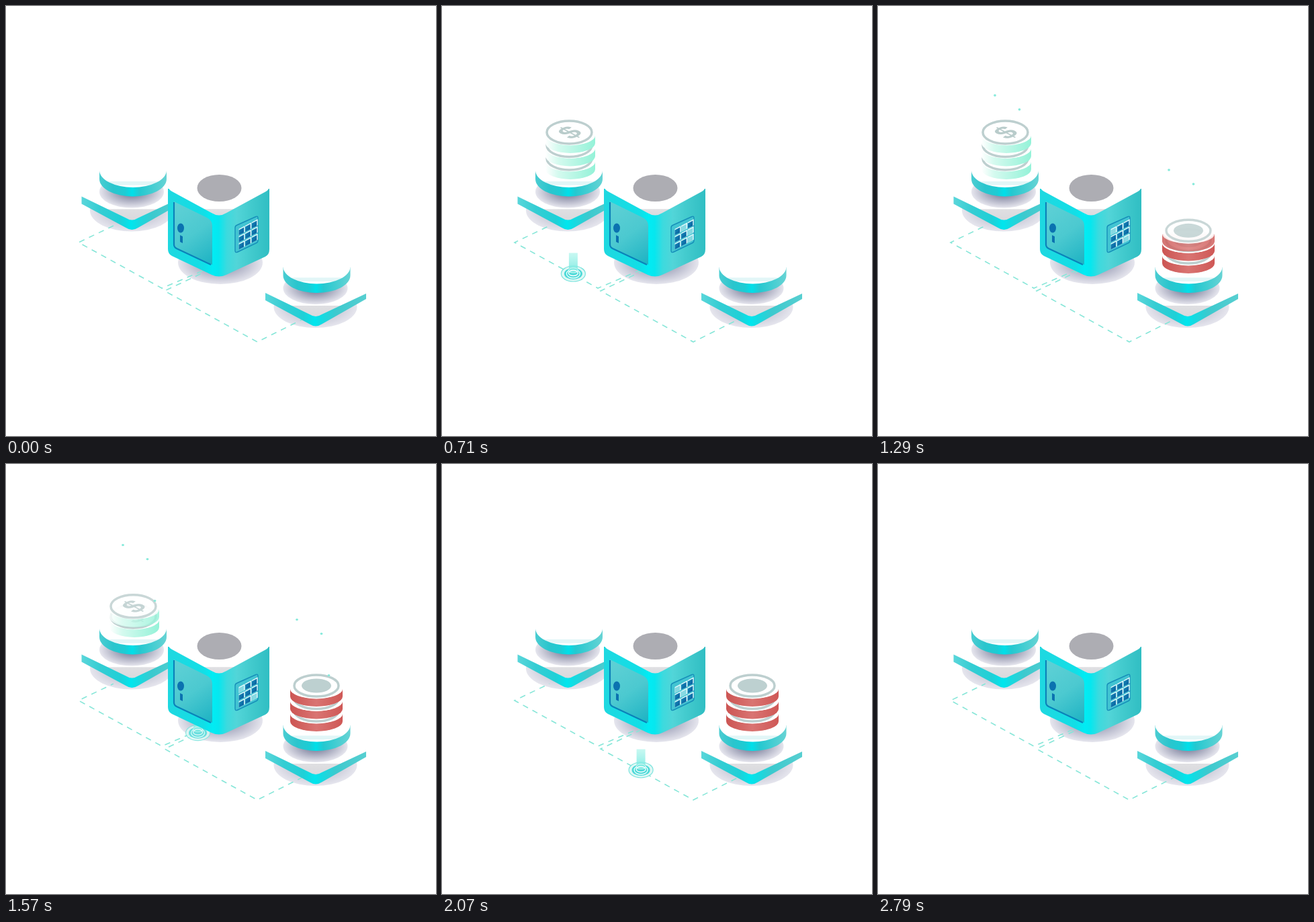
Recreate the animation shown at these times as an HTML page with a canvas. Size 640 px wide and 640 px high, loop 2.87 s.

```html
<!DOCTYPE html>
<html lang="en">
<head>
<meta charset="utf-8">
<title>Coin vault</title>
<style>
  html, body { margin: 0; width: 100%; height: 100%; overflow: hidden; background: #fff; }
  canvas { display: block; width: 640px; height: 640px; }
</style>
</head>
<body>
<canvas id="stage" width="640" height="640"></canvas>
<script>
const ctx = document.getElementById('stage').getContext('2d');
const LOOP = 2870, STEPS = 40;
const LEFT = [-273.5, -143.5], RIGHT = [0, 0];
const clamp = v => Math.max(0, Math.min(1, v));

function gradient(x0, y0, x1, y1, stops) {
  const g = ctx.createLinearGradient(x0, y0, x1, y1);
  stops.forEach(([at, color]) => g.addColorStop(at, color));
  return g;
}

function shape(d, fill, stroke, width = 1) {
  const path = new Path2D(d);
  if (fill) { ctx.fillStyle = fill; ctx.fill(path); }
  if (stroke) { ctx.strokeStyle = stroke; ctx.lineWidth = width; ctx.stroke(path); }
}

function ellipse(x, y, rx, ry, fill, stroke, width = 1) {
  ctx.beginPath();
  ctx.ellipse(x, y, rx, ry, 0, 0, Math.PI * 2);
  if (fill) { ctx.fillStyle = fill; ctx.fill(); }
  if (stroke) { ctx.strokeStyle = stroke; ctx.lineWidth = width; ctx.stroke(); }
}

function rim(x, y, rx, ry, height, fill) {
  ctx.beginPath();
  ctx.moveTo(x - rx, y);
  ctx.ellipse(x, y + height, rx, ry, 0, Math.PI, 0, true);
  ctx.lineTo(x + rx, y);
  ctx.fillStyle = fill;
  ctx.fill();
}

function shadow(x, y, rx, ry, inner) {
  ctx.save();
  ctx.translate(x, y);
  ctx.scale(rx, ry);
  const g = ctx.createRadialGradient(0, 0, 0.3, 0, 0, 1);
  g.addColorStop(0, inner);
  g.addColorStop(1, '#e6e6ee');
  ellipse(0, 0, 1, 1, g);
  ctx.restore();
}

function at([dx, dy], draw) {
  ctx.save();
  ctx.translate(dx, dy);
  draw();
  ctx.restore();
}

function platform() {
  shape('M386 427V438L452 473.5Q461 479.5 470 473.5L536 436V428Z', gradient(386, 0, 536, 0, [
    [0, '#5ad6da'], [.18, '#35cdd3'], [.38, '#1fd0d7'], [.49, '#00e6ee'], [.56, '#14dbe2'],
    [.7, '#3cc9ce'], [1, '#58cfd1']]));
  shape('M386 427L452 459Q461 465 470 459L536 428L470 396Q461 391 452 396Z', gradient(0, 390, 0, 464, [
    [0, '#fff'], [.75, '#fff'], [.76, '#dfdfe2'], [1, '#d8d8dc']]));
  shadow(460.5, 420, 48, 24, '#8d90a9');
  rim(462.5, 389, 50, 26, 12, gradient(413, 0, 512, 0, [
    [0, '#4acdd2'], [.2, '#2bc5cd'], [.38, '#1cccd4'], [.49, '#00dfe9'], [.6, '#24c8d0'], [1, '#66d3d4']]));
  ellipse(462.5, 388, 50, 25.5, gradient(0, 362, 0, 414, [
    [0, '#fff'], [.81, '#fff'], [.82, '#e2f6f7'], [.92, '#e2f6f7'], [.93, '#fff'], [1, '#fff']]));
}

function vault(step) {
  shape('M241 272V362Q241 369 247 372L306 400Q317 405 328 400L386 373Q392 370 392 362V272Z',
    gradient(241, 0, 392, 0, [[0, '#1fd8e0'], [.35, '#12dee6'], [.44, '#00ecf4'], [.5, '#06e7ef'],
      [.58, '#3cdade'], [.68, '#52d5d8'], [.82, '#42cacd'], [1, '#30bec3']]));
  shape('M247 266L307 237Q317 232 327 237L387 266Q395 271 387 276L328 308Q317 315 306 308L247 276Q238 271 247 266Z',
    gradient(0, 233, 0, 314, [[0, '#fff'], [.85, '#fff'], [.86, '#e0e0e3'], [1, '#d9d9dd']]));
  ellipse(317.5, 271, 33, 20, '#adadb3');

  // Door
  shape('M250 291L299 315Q307 319 307 327V385L250 358Z', gradient(250, 300, 306, 380, [
    [0, '#5dd0d5'], [.5, '#4cc9d0'], [1, '#20b4c4']]));
  shape('M250 292V355Q250 359 254 361L305 385', null, '#0b82b9', 2.2);
  ellipse(260, 330.5, 5, 7, '#0b72b0');
  shape('M259 341L263 343V353L259 351Z', '#0b72b0');
  keypad(step);
}

const litKeys = [[0, 7], [1, 5, 8], [0, 8], [4, 0], [2, 6]];
function keypad(step) {
  shape('M341 330Q341 327 344 326L372 313.5Q375 312 375 316V349Q375 352 372 353L345 366Q341 368 341 364Z',
    '#42c4d2', '#168fb9', 1.4);
  const lit = step < 2 || step > 35 ? [] : litKeys[Math.floor((step - 2) / 7)];
  for (let i = 0; i < 9; i++) {
    const col = i % 3, row = (i - col) / 3;
    ctx.save();
    ctx.transform(1, -.52, 0, 1, 346.5 + col * 9.6, 333 - col * 5 + row * 10.7);
    ctx.fillStyle = '#e8fbfd';
    ctx.fillRect(0, -1, 9, 9);
    ctx.fillStyle = lit.includes(i) ? '#86d9e2' : gradient(0, 0, 8, 8, [[0, '#1686b6'], [1, '#075f9f']]);
    ctx.fillRect(0, .5, 7.6, 7.6);
    ctx.restore();
  }
}

function coin(x, y, rx, edge, ringX, ringRx, ringRy) {
  rim(x, y + 5, rx, 15, 11, edge);
  rim(x, y, rx, 14, 5, '#fff');
  ellipse(x, y, rx, 19.5, '#fff');
  ellipse(ringX, y, ringRx, ringRy, null, '#bdcfcf', 3.5);
}

function mintCoin(y) {
  coin(191, y, 37, gradient(154, 0, 228, 0, [[0, '#fff'], [.25, '#d5faef'], [1, '#94f2d8']]), 189.5, 33.5, 17);
  ctx.save();
  ctx.transform(.87, -.47, .87, .47, 190, y);
  ctx.font = 'bold 39px "Liberation Sans", Arial, sans-serif';
  ctx.textAlign = 'center';
  ctx.fillStyle = '#b9cccb';
  ctx.fillText('$', 0, 13.5);
  ctx.restore();
}

function redCoin(y) {
  coin(462, y, 39, gradient(423, 0, 501, 0, [[0, '#cc5553'], [.5, '#d97472'], [1, '#cf5856']]), 462, 33, 16);
  ellipse(462, y, 22, 10.5, '#bdd0d0');
}

// Each coin rises into place from its start step and sinks away before its end step.
function stack(step, base, gap, spans, drawCoin) {
  spans.forEach(([start, end], level) => {
    const shown = Math.min(clamp((step - start) / 3), clamp((end - step) / 3));
    if (!shown) return;
    ctx.globalAlpha = Math.sqrt(shown);
    drawCoin(base - gap * level + 13 * (1 - shown));
    ctx.globalAlpha = 1;
  });
}

function sparks(step) {
  [[174, 133, 12], [210.5, 154, 12], [221.5, 216, 22]].forEach(([x, y, start]) => {
    if (step < start) return;
    ctx.globalAlpha = clamp((28 - step) / 4);
    ellipse(x, y - (step - 18) * 3.1, 1.9, 1.7, '#86eadb');
  });
  ctx.globalAlpha = 1;
}

function dashes(step) {
  ctx.save();
  ctx.setLineDash([8.5, 7.5]);
  ctx.lineDashOffset = -step / STEPS * 80;
  shape('M160 327L108 352L232 420L300 391', null, '#86e6d8', 1.6);
  shape('M304 392L236 424L374 500L440 467', null, '#86e6d8', 1.6);
  ctx.restore();
}

function pulse(points, distance) {
  const lengths = points.slice(1).map(([x, y], i) => Math.hypot(x - points[i][0], y - points[i][1]));
  const total = lengths.reduce((a, b) => a + b);
  if (distance <= 0 || distance >= total) return;
  let i = 0, rest = distance;
  while (rest > lengths[i]) rest -= lengths[i++];
  const k = rest / lengths[i], [ax, ay] = points[i], [bx, by] = points[i + 1];
  ctx.save();
  ctx.translate(ax + (bx - ax) * k, ay + (by - ay) * k);
  ctx.globalAlpha = clamp(Math.min(distance, total - distance) / 20);
  ellipse(0, 1, 18, 11.5, '#dff8f5', '#79e3dd', 1.2);
  ellipse(0, 1, 13.5, 8.5, '#4cd9d8');
  ellipse(0, 1, 10, 6.5, null, '#e8fffc', 1.4);
  ctx.fillStyle = gradient(0, -31, 0, 2, [[0, '#a0f3e890'], [1, '#6ee7dfee']]);
  ctx.fillRect(-6.5, -30, 13, 30);
  ellipse(0, 0, 7, 4, null, '#fff', 1.3);
  ellipse(0, -4, 7, 3.6, null, '#ffffffb0', 1);
  ctx.restore();
}

const inbound = [[160, 328], [115, 351], [236, 421], [300, 389]];
const outbound = [[300, 392], [240, 422], [373, 499], [440, 464]];

function render(step) {
  ctx.fillStyle = '#fff';
  ctx.fillRect(0, 0, 640, 640);
  for (const spot of [LEFT, RIGHT]) at(spot, () => shadow(460.5, 448, 62, 31, '#b9bacb'));
  shadow(319, 382, 63, 32, '#9a9db6');
  dashes(step);
  pulse(inbound, 52.5 + (step - 4) * 15.15);
  pulse(outbound, 74 + (step - 25) * 19.3);
  at(LEFT, platform);
  stack(step, 227, 19.5, [[.8, 28], [3.7, 24], [5, 21]], mintCoin);
  vault(step);
  at(RIGHT, platform);
  stack(step, 367, 18.5, [[11, 38], [13.5, 35.5], [16, 33]], redCoin);
  sparks(step);
  at([259, 111], () => sparks(step));
}

function tick() {
  const time = performance.now() % LOOP;
  render(Math.floor((time + 8) / LOOP * STEPS) % STEPS);
  requestAnimationFrame(tick);
}
tick();
</script>
</body>
</html>
```
